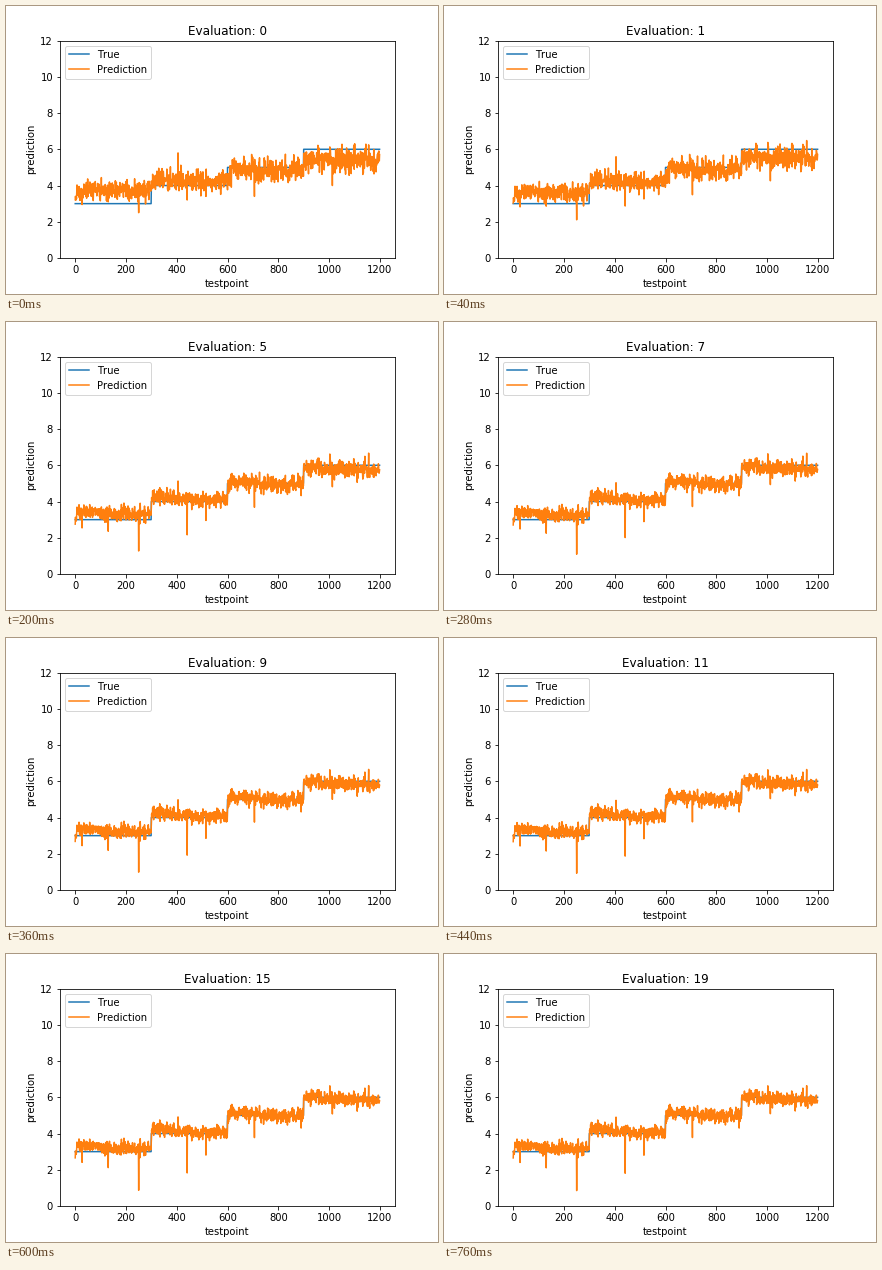
Recreate the animation shown at these times as a matplotlib script. Size 432x288 px, loop 800 ms.

```python
import numpy as np
import matplotlib.pyplot as plt
from matplotlib.animation import FuncAnimation

FRAMES, INTERVAL = 20, 40
POINTS, SEGMENT = 1200, 300
DECAY = 3.7  # evaluations per e-fold of learning

# Outliers: test point -> (untrained, trained) prediction
OUTLIERS = {
    27: (2.95, 2.4),
    130: (3.1, 2.1),
    250: (2.5, 0.84),
    405: (5.8, 4.9),
    441: (3.2, 1.8),
    515: (3.4, 2.8),
    706: (3.4, 3.78),
    890: (4.4, 4.3),
    1013: (4.0, 5.1),
}

rng = np.random.default_rng(7)
x = np.arange(POINTS)
segment, offset = np.divmod(x, SEGMENT)
true = 3 + segment
early, late = np.clip(rng.normal(size=(2, POINTS)), -2.8, 2.8)


def predict(step):
    error = np.exp(-step / DECAY)
    learned = 1 - error

    # Levels are pulled to the centre; each step lags, then overshoots
    pull = (0.10 + 0.35 * error) * (1.7 - segment)
    lag = 0.55 * np.exp(-offset / 5)
    overshoot = 0.25 * learned * np.exp(-offset / 90)

    spread = (0.18 + 0.12 * error) * (1 + 0.06 * segment)
    turn = 1.1 * learned
    noise = np.cos(turn) * early + np.sin(turn) * late

    y = true + pull - lag + overshoot + spread * noise
    for point, (start, end) in OUTLIERS.items():
        y[point] = start + (end - start) * learned
    return y


plt.rcParams["text.kerning_factor"] = 6  # whole-pixel kerning

fig, ax = plt.subplots(figsize=(6, 4), dpi=72)
fig.subplots_adjust(left=0.125, right=0.9, bottom=0.125, top=0.88)
ax.plot(x, true, color="tab:blue", label="True")
line, = ax.plot(x, predict(0), color="tab:orange", label="Prediction")
ax.set_ylim(0, 12)
ax.set_xlabel("testpoint")
ax.set_ylabel("prediction")
ax.legend(loc="upper left")
title = ax.set_title("Evaluation: 0")


def update(step):
    line.set_ydata(predict(step))
    title.set_text(f"Evaluation: {step}")
    return line, title


anim = FuncAnimation(fig, update, frames=FRAMES, interval=INTERVAL,
                     repeat=True, repeat_delay=0)
plt.show()
```
